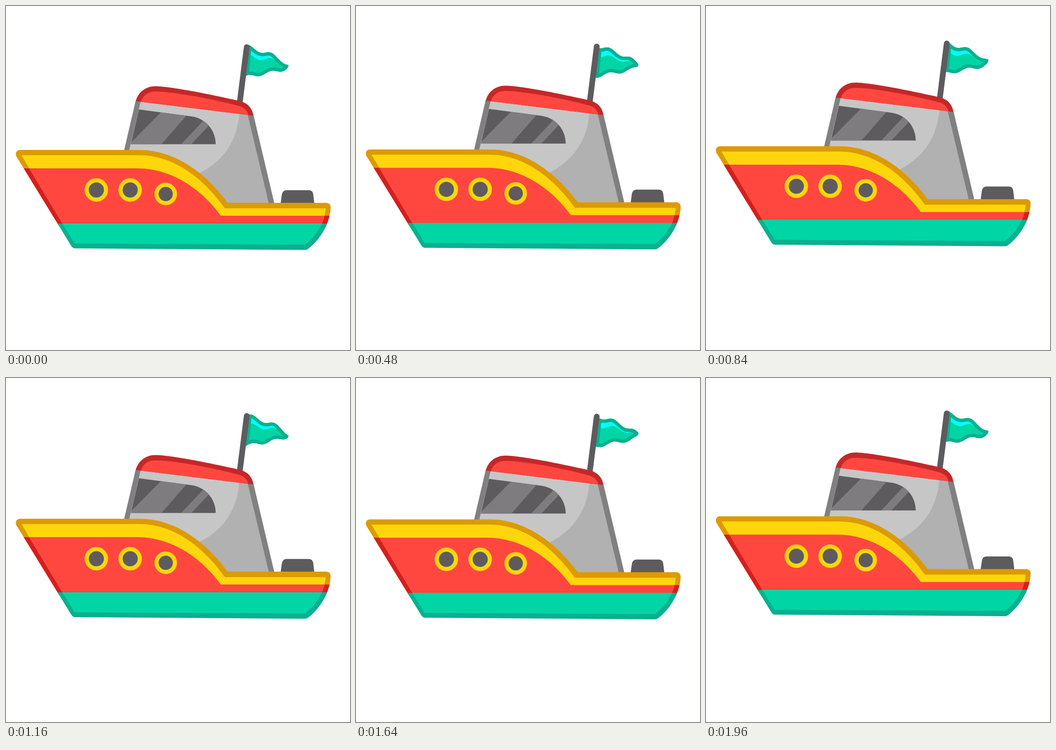
Recreate the animation shown at these times as an HTML page. Size 748 by 748 pixels, loop 2000 ms.

```html
<!DOCTYPE html>
<html lang="en">
<head>
<meta charset="utf-8">
<title>Bobbing boat</title>
<style>
  html, body { margin: 0; width: 100%; height: 100%; overflow: hidden; background: #fff; }
  svg { display: block; width: 100vw; height: 100vh;
        --red: #ff4740; --green: #00d5a5; --yellow: #ffd60b; }
  .rim { --red: #d41f20; --green: #0ab08f; --yellow: #dc9a03; }
  .red { fill: var(--red); }
  .green { fill: var(--green); }
  .yellow { fill: var(--yellow); }
  .grey { fill: #5e5b5f; }
  .port { fill: #5e5b5f; stroke: #ffd60b; stroke-width: 9; }
</style>
</head>
<body>
<svg viewBox="0 0 748 748">
  <defs>
    <clipPath id="hull">
      <path d="M31 313H290C366 313 434 362 482 428H697Q706 429 706 438C704 474 684 507 657 528Q654 530.500 649 530.500L150 527Q145 527 141.500 521L22.500 327C19.500 320 23 313 31 313Z"/>
    </clipPath>
    <clipPath id="hullInner">
      <path d="M33.500 324.500H290C364 324.500 428 373 476 440H695C693 470 676 500 650 519L149 516.500Z"/>
    </clipPath>
    <clipPath id="cabin">
      <path d="M282 206L538 237L584 432H477L380 350L255 322Z"/>
    </clipPath>
    <clipPath id="window">
      <path id="pane" d="M289 225L403 240C434 244 456 270 456 300.500H271.500Z"/>
    </clipPath>
    <clipPath id="flagClip"><path id="flagShape"/></clipPath>
    <g id="bands">
      <path class="yellow" d="M0 300H748V480H0Z"/>
      <path class="red" d="M0 353H285C360 353 425 398 467 456H748V480H0Z"/>
      <path class="green" d="M0 473H748V540H0Z"/>
    </g>
  </defs>

  <g id="boat">
    <g clip-path="url(#flagClip)">
      <use href="#flagShape" class="green"/>
      <path id="shine" fill="#0ff"/>
      <use href="#flagShape" fill="none" stroke="#0ab08f" stroke-width="15"/>
    </g>
    <path d="M523.500 89.500L508 212" stroke="#5e5b5f" stroke-width="12.500" stroke-linecap="round"/>

    <g clip-path="url(#cabin)">
      <path fill="#c6c6c6" d="M250 190H600V440H250Z"/>
      <path fill="#b1b1b1" d="M508 225C505 293 473 337 420 364L470 440H600V225Z"/>
      <path fill="#808080" d="M282 200H294.500L266 322H250ZM523.500 228L574 440H600L540 228Z"/>
    </g>
    <path fill="#c42829" d="M282 207C287 188 303 174.500 325 174.500C356 174.500 442 191.500 510 207C526 211.500 536 223 538 238.500Z"/>
    <path class="red" d="M293 208.500C298 194 309 186 325 186C366 186 452 203 507 217.500C519 221 525 228 527 237Z"/>
    <use href="#pane" class="grey"/>
    <path clip-path="url(#window)" fill="#7f7c80" d="M343 225L268 300.500H338L404 225ZM452 225L381 300.500H403L474 225Z"/>

    <path class="grey" d="M597 430L600 409Q602 400.500 610 400.500H659Q667 401 668 409L670.500 430Z"/>
    <g clip-path="url(#hull)">
      <use href="#bands" class="rim"/>
      <g clip-path="url(#hullInner)"><use href="#bands"/></g>
    </g>
    <circle class="port" cx="196.500" cy="400" r="21"/>
    <circle class="port" cx="270" cy="400" r="21"/>
    <circle class="port" cx="347.300" cy="408.700" r="20"/>
  </g>
</svg>
<script>
const LOOP = 2000, STEP = 40, WAVE_TIME = 1000, WAVE_LENGTH = 50, SAMPLES = 12;
const byId = id => document.getElementById(id);

// Turning points of the bob (ms, px); the outer two lie beyond the loop
const turns = [[-220, -1.8], [220, 1.8], [920, -8.4], [1480, -4.6], [2440, -20.6]];

function height(t) {
  const i = turns.findIndex(turn => turn[0] > t);
  const [t0, y0] = turns[i - 1], [t1, y1] = turns[i];
  return y0 + (y1 - y0) * (1 - Math.cos(Math.PI * (t - t0) / (t1 - t0))) / 2;
}

// Ripple travelling from the pole to the tip
const ripple = (x, t) =>
  Math.cos(2 * Math.PI * (t / WAVE_TIME - 0.72 - (x - 538) / WAVE_LENGTH));

// Flag edges for u from 0 at the pole to 1 at the tip
function topPoint(u, t) {
  const x = 527 + 87 * u;
  return [x, 88.5 + 28 * u + 12 * u ** 4 + 4.4 * ripple(x, t)];
}
function lowPoint(u, t) {
  const x = 520 + 92 * u;
  return [x, 155 - 17 * u - 4 * u ** 12 + 3.5 * ripple(x, t)];
}

const sample = (edge, from, to) => Array.from({ length: SAMPLES + 1 },
  (_, i) => edge(from + (to - from) * i / SAMPLES));

// Catmull-Rom curve through the points
function curve(points) {
  const at = i => points[Math.min(points.length - 1, Math.max(0, i))];
  const mix = (p, a, b) => p.map((v, k) => (v + (b[k] - a[k]) / 6).toFixed(2)).join(" ");
  let d = "M" + points[0].join(" ");
  for (let i = 0; i < points.length - 1; i++) {
    d += "C" + mix(at(i), at(i - 1), at(i + 1)) + " "
      + mix(at(i + 1), at(i + 2), at(i)) + " " + at(i + 1).join(" ");
  }
  return d + "Z";
}

function draw(now) {
  const t = Math.floor((now % LOOP) / STEP) * STEP;
  byId("boat").setAttribute("transform", `translate(0 ${height(t).toFixed(2)})`);

  const top = sample(u => topPoint(u, t), 0, 1);
  const low = sample(u => lowPoint(u, t), 1, 0);
  byId("flagShape").setAttribute("d", curve([...top, ...low]));

  const below = (u, gap) => {
    const [x, y] = topPoint(u, t);
    return [x, y + gap];
  };
  const upper = sample(u => below(u, 6), 0.04, 0.82);
  const lower = sample(u => below(u, 8 + 16 * (0.82 - u)), 0.82, 0.04);
  byId("shine").setAttribute("d", curve([...upper, ...lower]));
}

function tick() {
  draw(performance.now());
  requestAnimationFrame(tick);
}
tick();
</script>
</body>
</html>
```
